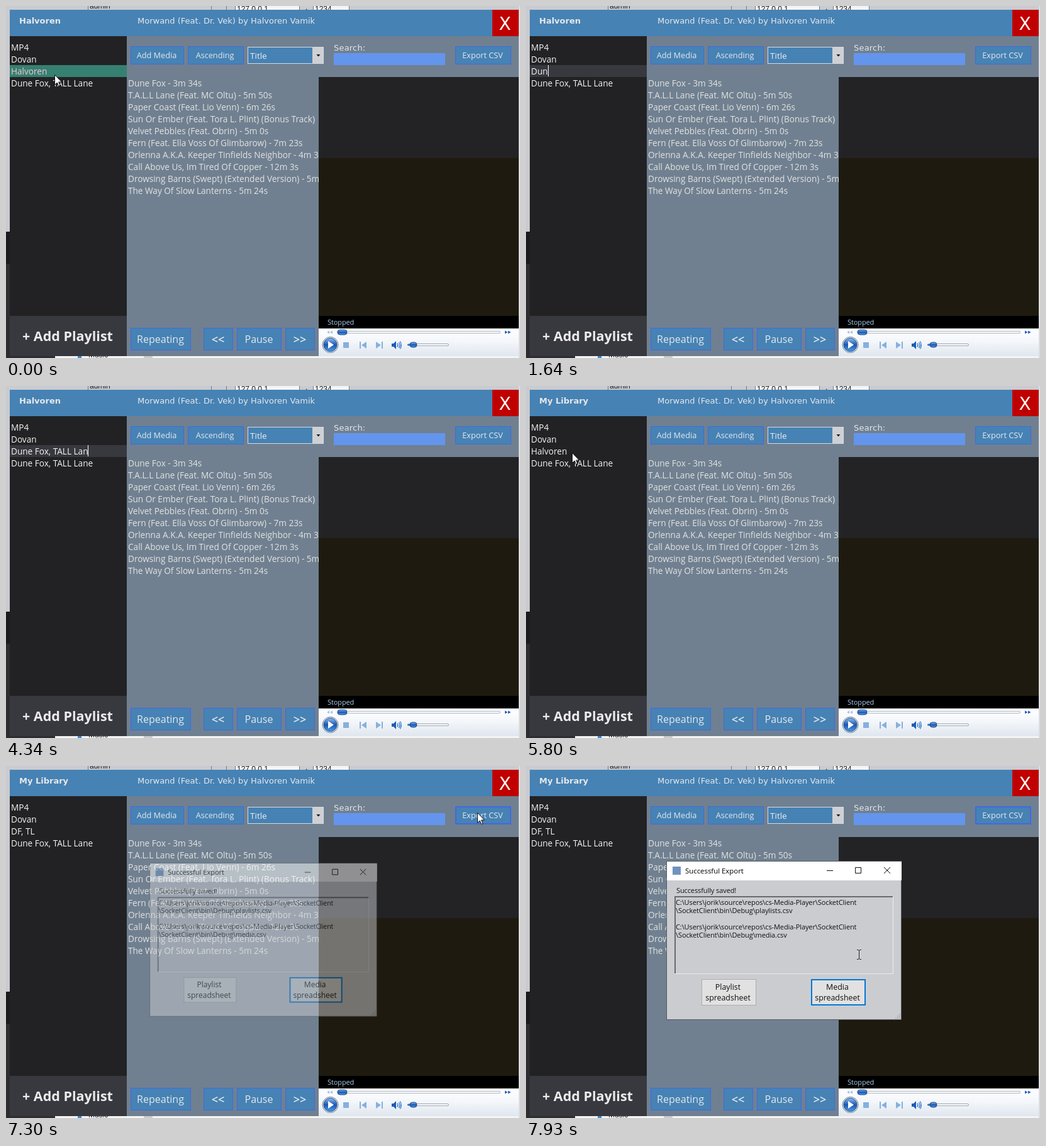
An HTML page that plays this animation: 817 by 560 pixels, repeating every 8000 ms.

```html
<!DOCTYPE html>
<html lang="en">
<head>
<meta charset="utf-8">
<title>Media player</title>
<style>
html, body { margin: 0; width: 817px; height: 560px; overflow: hidden; background: #c9cbd0; }
svg { position: absolute; left: 0; top: 0; }
text { white-space: pre; }
.ui { font: 12.7px "Open Sans", "Noto Sans", sans-serif; }
.list, #edit { font: 13.6px "Open Sans", "Noto Sans", sans-serif; }
.wide { font: 13px "DejaVu Sans", sans-serif; }
.big { font-size: 16px; }
.skip { font-size: 18px; font-weight: 600; }
.mid { text-anchor: middle; }
.small { font: 11px "Open Sans", "Noto Sans", sans-serif; letter-spacing: -.1px; }
.back { font: 12px "Liberation Sans", sans-serif; fill: #222; }
.btn rect { fill: #4682b4; stroke: #4169e1; }

/* 1% of the loop is 80 ms */
.t, #edit::before { animation: 8s step-end infinite; }
.early { animation-name: early; }
.late { animation-name: late; }
.picked { animation-name: picked; }
.former { animation-name: former; }
.renamed { animation-name: renamed; }
.focus { animation-name: focus; }
.arrow { animation-name: arrow; }
.beam { animation-name: beam; }
.pointer { animation-name: move; }
.dialog { animation-name: open; transform-origin: 409px 275px; }
#edit {
  position: absolute; left: 6px; top: 94px; width: 184px; height: 19px; padding-left: 2px;
  background: #38383f; color: #f4f4f4; line-height: 19px; white-space: pre;
  animation-name: edit;
}
#edit::before {
  content: ""; display: inline-block; height: 18px; line-height: 19px;
  vertical-align: top; border-right: 1px solid #fff; animation-name: type;
}
@keyframes early { 0% { visibility: visible } 72.5%, to { visibility: hidden } }
@keyframes late { 0% { visibility: hidden } 72.5%, to { visibility: visible } }
@keyframes picked { 0% { visibility: visible } 4%, to { visibility: hidden } }
@keyframes edit { 0%, 72.5%, to { visibility: hidden } 4% { visibility: visible } }
@keyframes former { 0%, 77%, to { visibility: hidden } 72.5% { visibility: visible } }
@keyframes renamed { 0% { visibility: hidden } 77%, to { visibility: visible } }
@keyframes focus { 0% { visibility: hidden } 90.25%, to { visibility: visible } }
@keyframes arrow { 0%, 72.5% { visibility: visible } 4%, 96.25%, to { visibility: hidden } }
@keyframes beam { 0%, 13.75% { visibility: hidden } 4%, 96.25%, to { visibility: visible } }
@keyframes type {
  0%, 4% { content: "Halvoren"; background: #0078d7 }
  13.75% { content: ""; background: none }
  15.75% { content: "D" }
  17.75% { content: "Du" }
  20.5% { content: "Dun" }
  23.375% { content: "Dune" }
  25.375% { content: "Dune " }
  27.25% { content: "Dune F" }
  31.125% { content: "Dune Fo" }
  33.25% { content: "Dune Fox" }
  35.375% { content: "Dune Fox," }
  37.5% { content: "Dune Fox, " }
  39.625% { content: "Dune Fox, T" }
  41.75% { content: "Dune Fox, TA" }
  44.625% { content: "Dune Fox, TAL" }
  46.5% { content: "Dune Fox, TALL" }
  48.5% { content: "Dune Fox, TALL " }
  50.5% { content: "Dune Fox, TALL L" }
  54.25% { content: "Dune Fox, TALL Lan" }
  57.125% { content: "Dune Fox, TALL Lane" }
  59%, to { content: "DF, TL"; background: none }
}
@keyframes move {
  0% { transform: translate(77px, 109px) }
  2% { transform: translate(76px, 108px) }
  4% { transform: translate(75px, 107px) }
  72.5% { transform: translate(73px, 106px) }
  75% { transform: translate(76px, 108px) }
  77% { transform: translate(88px, 114px) }
  78.75% { transform: translate(108px, 121px) }
  80% { transform: translate(128px, 127px) }
  81.25% { transform: translate(144px, 131px) }
  82.5% { transform: translate(153px, 133px) }
  90.25% { transform: translate(749px, 74px) }
  92.25% { transform: translate(748px, 76px) }
  93.25% { transform: translate(735px, 95px) }
  94.25% { transform: translate(690px, 150px) }
  95.25% { transform: translate(630px, 210px) }
  96.25% { transform: translate(572px, 252px) }
  97.25% { transform: translate(545px, 285px) }
  98.125% { transform: translate(532px, 298px) }
  99.125%, to { transform: translate(529px, 300px) }
}
@keyframes open {
  0% { opacity: 0; transform: scale(.967) }
  91.25% { opacity: .5; transform: translate(-1px, -1px) scale(.967) }
  92.25% { opacity: .88; transform: scale(.99) }
  93.25%, to { opacity: 1; transform: none }
}
</style>
</head>
<body>
<svg width="817" height="560">
  <defs>
    <clipPath id="listClip"><rect x="192" y="113" width="305" height="380"/></clipPath>
    <linearGradient id="bar" x2="0" y2="1">
      <stop offset="0" stop-color="#fff"/><stop offset=".5" stop-color="#f3f6fa"/><stop offset="1" stop-color="#dfe6ee"/>
    </linearGradient>
    <linearGradient id="knob" x2="0" y2="1">
      <stop offset="0" stop-color="#8fc0f0"/><stop offset=".5" stop-color="#1a55b0"/><stop offset="1" stop-color="#4fa0e8"/>
    </linearGradient>
  </defs>

  <!-- desktop behind the window -->
  <rect width="817" height="560" fill="#c9cbd0"/>
  <path d="M365 0H466V6H365ZM489 0H545V6H489Z" fill="#f4f4f5"/>
  <path d="M130.500 0V6M326.500 0V6M350.500 0V6M364.500 0V6M466.500 0V6M488.500 0V6M545.500 0V6" stroke="#77797d"/>
  <g class="back">
    <text x="133" y="4">admin</text><text x="367" y="9">127.0.0.1</text>
    <text x="476" y="6">.</text><text x="491" y="9">1234</text>
  </g>
  <path d="M0 359H6V410H0Z" fill="#1b1b1f"/>
  <path d="M0 410H6V557H78V560H0Z" fill="#2d2d31"/>
  <path d="M78 556H817V560H78Z" fill="#f4f4f5"/>
  <path d="M219 556H233V560H219Z" fill="#c9cbd0"/>
  <path d="M114 556H120V560H114Z" fill="#3a86d0"/>
  <text class="back" x="131" y="559">Music</text>
  <path d="M815 0H817V560H815Z" fill="#dcdde0"/>

  <!-- window -->
  <path d="M192 48H815V557H192Z" fill="#708090"/>
  <path d="M6 6H773V48H6Z" fill="#4682b4"/>
  <path d="M773 6H815V48H773Z" fill="#c00000"/>
  <path d="M6 48H192V493H6Z" fill="#222224"/>
  <path d="M6 493H192V557H6Z" fill="#38383f"/>
  <g class="wide" fill="#e6e8ea">
    <g font-weight="bold">
      <text class="t early" x="21" y="28">Halvoren</text>
      <text class="t late" x="21" y="28">My Library</text>
    </g>
    <text x="209" y="28">Morwand (Feat. Dr. Vek) by Halvoren Vamik</text>
    <text x="521" y="71" letter-spacing=".2">Search:</text>
    <text class="mid" x="793" y="38" style="font-size:28px" fill="#fff">X</text>
  </g>
  <text class="ui" x="26" y="533" fill="#ececec" style="font-size:21.5px;font-weight:bold">+ Add Playlist</text>

  <!-- playlists -->
  <g class="list" fill="#f2f2f2">
    <text x="8" y="71">MP4</text>
    <text x="8" y="90">Dovan</text>
    <g class="t picked">
      <path d="M6 94H192V113H6Z" fill="#368072"/>
      <text x="8" y="109" fill="#f6c6d2">Halvoren</text>
    </g>
    <text class="t former" x="8" y="109">Halvoren</text>
    <text class="t renamed" x="8" y="109">DF, TL</text>
    <text x="8" y="128">Dune Fox, TALL Lane</text>
  </g>

  <!-- tracks -->
  <g class="list" fill="#e2e2e2" clip-path="url(#listClip)">
    <text x="194" y="128">Dune Fox - 3m 34s</text>
    <text x="194" y="147">T.A.L.L Lane (Feat. MC Oltu) - 5m 50s</text>
    <text x="194" y="166">Paper Coast (Feat. Lio Venn) - 6m 26s</text>
    <text x="194" y="185">Sun Or Ember (Feat. Tora L. Plint) (Bonus Track)</text>
    <text x="194" y="204">Velvet Pebbles (Feat. Obrin) - 5m 0s</text>
    <text x="194" y="223">Fern (Feat. Ella Voss Of Glimbarow) - 7m 23s</text>
    <text x="194" y="242">Orlenna A.K.A. Keeper Tinfields Neighbor - 4m 33s</text>
    <text x="194" y="261">Call Above Us, Im Tired Of Copper - 12m 3s</text>
    <text x="194" y="280">Drowsing Barns (Swept) (Extended Version) - 5m 13s</text>
    <text x="194" y="299">The Way Of Slow Lanterns - 5m 24s</text>
  </g>

  <!-- buttons -->
  <g class="ui btn mid" fill="#e6e8ea">
    <rect x="198.500" y="64.500" width="84" height="28"/><text x="239.500" y="83">Add Media</text>
    <rect x="289.500" y="64.500" width="88" height="28"/><text x="332" y="83">Ascending</text>
    <rect x="714.500" y="64.500" width="88" height="28"/>
    <rect class="t focus" x="715" y="65" width="87" height="27" stroke-width="2"/>
    <text x="757.500" y="83">Export CSV</text>
    <g class="big">
      <rect x="198.500" y="512.500" width="95" height="35"/><text x="245.500" y="536">Repeating</text>
      <rect x="314.500" y="512.500" width="46" height="35"/><text class="skip" x="337" y="537">&lt;&lt;</text>
      <rect x="367.500" y="512.500" width="70" height="35"/><text x="402" y="536">Pause</text>
      <rect x="444.500" y="512.500" width="46" height="35"/><text class="skip" x="467" y="537">&gt;&gt;</text>
    </g>
  </g>
  <rect x="384.500" y="65.500" width="120" height="26" fill="#4682b4" stroke="#d4dae4"/>
  <path d="M487 66H504V91H487Z" fill="#cfd0d4"/>
  <path d="M493.500 77H499.500L496.500 80.500Z" fill="#111"/>
  <text class="ui" x="388" y="84" fill="#f0f0f0" style="font-size:13.5px">Title</text>
  <path d="M521 75H698V94H521Z" fill="#6495ed"/>

  <!-- video and transport -->
  <path d="M497 113H815V242H497Z" fill="#232326"/>
  <path d="M497 242H815V493H497Z" fill="#1e1a0f"/>
  <path d="M497 493H815V513H497Z"/>
  <text class="small" x="511" y="507" fill="#a9cbea">Stopped</text>
  <path d="M497 513H815V557H497Z" fill="url(#bar)"/>
  <path d="M514 516.500V521.500L510 519ZM519 516.500V521.500L515 519Z" fill="#a3c2e4"/>
  <path d="M793 516.500V521.500L797.500 519ZM798 516.500V521.500L802.500 519Z" fill="#1c5cb8"/>
  <rect x="526.500" y="517.500" width="259" height="3" rx="1.500" fill="#fff" stroke="#aab4c0"/>
  <rect x="527" y="515" width="15" height="8" rx="4" fill="url(#knob)" stroke="#1d4c94"/>
  <circle cx="515.500" cy="539" r="12.500" fill="#dde4ec" stroke="#6f7e90"/>
  <circle cx="515.500" cy="539" r="10.500" fill="url(#knob)" stroke="#1d4c94"/>
  <path d="M512 533L521 539L512 545Z" fill="#fff"/>
  <g fill="#86b0de">
    <path d="M536 535H545V544H536Z"/>
    <path d="M562 534H564V545H562ZM573 534V545L565 539.500Z"/>
    <path d="M597 534H599V545H597ZM588 534V545L596 539.500Z"/>
  </g>
  <path d="M613 537H616L620 533V546L616 542H613Z" fill="#1c5cb8"/>
  <path d="M622 536.500Q624 539.500 622 542.500M624.500 535Q627.500 539.500 624.500 544M626.500 533.500Q630 539.500 626.500 545.500" fill="none" stroke="#2f78cf" stroke-width="1.300"/>
  <rect x="638.500" y="537.500" width="65" height="3" rx="1.500" fill="#fff" stroke="#98a4b2"/>
  <path d="M638 539H646" stroke="#2f78cf" stroke-width="2"/>
  <rect x="642" y="535" width="11" height="8" rx="4" fill="url(#knob)" stroke="#1d4c94"/>
</svg>

<div id="edit" class="t"></div>

<svg width="817" height="560">
  <g class="t dialog">
    <rect x="223.500" y="151.500" width="373" height="252" fill="#cbccd0" stroke="#55585c"/>
    <path d="M224 152H597V182H224Z" fill="#fff"/>
    <path d="M233 160H246V173H233Z" fill="#6f93bd"/>
    <text class="small" x="253" y="171" style="font-size:11.4px;letter-spacing:0">Successful Export</text>
    <path d="M478 166.500H488M523.500 161.500H532.500V170.500H523.500ZM569 161L579 171M579 161L569 171" fill="none" stroke="#111"/>
    <path d="M237 331V208H584" fill="none" stroke="#696a6d" stroke-width="2"/>
    <path d="M236 330.500H583.500V207" fill="none" stroke="#ececee"/>
    <g class="small" fill="#111">
      <text x="239" y="202">Successfully saved!</text>
      <text x="238" y="221">C:\Users\jorik\source\repos\cs-Media-Player\SocketClient</text>
      <text x="238" y="234">\SocketClient\bin\Debug\playlists.csv</text>
      <text x="238" y="260">C:\Users\jorik\source\repos\cs-Media-Player\SocketClient</text>
      <text x="238" y="273">\SocketClient\bin\Debug\media.csv</text>
    </g>
    <rect x="279.500" y="339.500" width="86" height="41" fill="#e1e1e1" stroke="#adadad"/>
    <rect x="454" y="340" width="85" height="40" fill="#e1e1e1" stroke="#0078d7" stroke-width="2"/>
    <g class="ui mid" fill="#111" style="font-size:12.4px">
      <text x="321" y="356">Playlist</text><text x="321" y="373">spreadsheet</text>
      <text x="495" y="356">Media</text><text x="495" y="373">spreadsheet</text>
    </g>
    <path d="M593 394h2v2h-2zM590 397h2v2h-2zM593 397h2v2h-2zM587 400h2v2h-2zM590 400h2v2h-2zM593 400h2v2h-2z" fill="#aeb0b4"/>
  </g>
  <g class="t pointer">
    <path class="t arrow" d="M.5 .5V16.500L4.200 13L6.700 18.500L9 17.500L6.500 12H11.500Z" fill="#fff" stroke="#111"/>
    <g class="t beam" fill="none">
      <path d="M-3 -7.500H-1L.5 -6.500L2 -7.500H4M.5 -7V7M-3 7.500H-1L.5 6.500L2 7.500H4" stroke="#e4e4e6" stroke-width="2"/>
      <path d="M-3 -7.500H-1L.5 -6.500L2 -7.500H4M.5 -7V7M-3 7.500H-1L.5 6.500L2 7.500H4" stroke="#111"/>
    </g>
  </g>
</svg>
</body>
</html>
```
